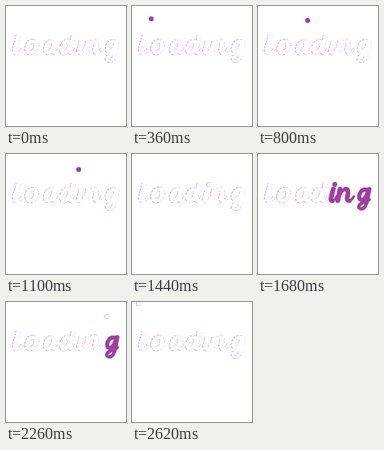
Animation of 150 by 150 pixels, one loop 2640 ms. Source, as an HTML page with a canvas:

```html
<!DOCTYPE html>
<html lang="en">
<head>
<meta charset="utf-8">
<title>Loading</title>
<style>
  html, body { margin: 0; width: 100%; height: 100%; overflow: hidden; background: #fff; }
  canvas { display: block; width: 150px; height: 150px; }
</style>
</head>
<body>
<canvas id="stage" width="150" height="150" role="img" aria-label="loading"></canvas>
<script>
const ctx = document.getElementById('stage').getContext('2d');
const LOOP = 2640, STEP = 20, BASELINE = 61;
const PURPLE = '#9f3fa2', FRINGE = '#c468cc';

// Each letter is a set of pen strokes: [pen width, path].
const letter = (center, hits, filled, ...strokes) => ({
  center, hits, filled,
  strokes: strokes.map(([width, d]) => ({ width, path: new Path2D(d) }))
});

const letters = [
  letter(13, [130], null,
    [5.2, 'M15 37L11 53Q9.5 58.3 13 58.3'],
    [2.6, 'M13 59Q18 58 20.5 53']),
  letter(33, [475], null,
    [5, 'M34 44C26 43 23 58.5 30 58.5C38 58.5 40 44 34 44'],
    [1.8, 'M37 47Q39 49 42 48']),
  letter(54, [720], null,
    [4.8, 'M60 45C50 41 46 58.5 52 58.5C56 58.5 59 52 60 46'],
    [5.2, 'M61.5 44L59 54Q58 58.3 61 58.3'],
    [2.6, 'M61 59Q65 57 66 53']),
  letter(75, [950], null,
    [4.8, 'M79 45C70 41 66 58.5 72 58.5C76 58.5 79 52 80 46'],
    [5.2, 'M84 37L80 54Q79 58.3 82 58.3'],
    [2.6, 'M82 59Q86 57 87 53']),
  letter(93, [1165, 1395, 1930], [1660, 1930],
    [5.6, 'M94 44L91.5 54Q90.5 58.2 93 58.2'],
    [2.6, 'M93 59Q97 57 98 53']),
  letter(109, [2130], [1660, 2110],
    [5.6, 'M102.5 44L99.8 58.2'],
    [3.6, 'M102 51Q106 44 109.5 43.7'],
    [5.4, 'M109.5 44Q114 44 112 52Q110 58.3 114 58.3'],
    [2.6, 'M114 59Q118 57 120 53']),
  letter(132, [2330], [1660, 2320],
    [4.8, 'M137 45C127 41 123 57.5 130 57.5C134 57 136 52 138 45'],
    [5.2, 'M139 44L135.5 61'],
    [3.8, 'M135.5 61Q134 69 128.5 68.6Q124 67.5 127 63.5Q130 60.5 139 57'])
];

// Resting points of the ball: time, x, y.
const stops = [
  [130, 13, 31], [245, 13, 31], [475, 35, 38], [720, 53, 38], [950, 79, 38],
  [1165, 96, 38], [1395, 96, 38], [1930, 96, 38], [2130, 112, 38], [2330, 134, 38]
];
const APEX = 16;
const mix = (a, b, u) => a + (b - a) * u;

function ballAt(t) {
  if (t < 40) return null;
  if (t < 130) {
    const u = (t - 40) / 90;
    return [mix(10, 13, u), mix(16, 31, u * u)];
  }
  for (let i = 1; i < stops.length; i++) {
    const [t0, x0, y0] = stops[i - 1], [t1, x1, y1] = stops[i];
    if (t >= t1) continue;
    const u = (t - t0) / (t1 - t0);
    const resting = t0 === 130 || t0 === 1395;
    const lift = resting ? 0 : 4 * ((y0 + y1) / 2 - APEX) * u * (1 - u);
    return [mix(x0, x1, u), mix(y0, y1, u) - lift];
  }
  if (t < 2500) return [134, mix(38, -5, (t - 2330) / 170)];
  if (t >= 2600) return [8, 2 - (2620 - t) * 0.15];
  return null;
}

function squash(hits, t) {
  return hits.reduce((sum, hit) => {
    const age = t - hit;
    return age < 0 || age > 180 ? sum
      : sum + Math.sin(age / 180 * Math.PI * 2) * (1 - age / 180);
  }, 0);
}

function drawLetter(item, t, color, grow, shift) {
  const s = squash(item.hits, t);
  ctx.save();
  ctx.translate(item.center + shift, BASELINE);
  ctx.scale(1 + 0.12 * s, 1 - 0.16 * s);
  ctx.translate(-item.center, -BASELINE);
  ctx.strokeStyle = color;
  for (const { width, path } of item.strokes) {
    ctx.lineWidth = width + grow;
    ctx.stroke(path);
  }
  ctx.restore();
}

function disc(x, y, r, color) {
  ctx.fillStyle = color;
  ctx.beginPath();
  ctx.arc(x, y, r, 0, Math.PI * 2);
  ctx.fill();
}

// A broken rim, heavier on the left, around a white body.
function drawHollow(items, t) {
  ctx.lineCap = 'butt';
  ctx.setLineDash([2.4, 1.1]);
  items.forEach(item => drawLetter(item, t, FRINGE, 0.8, 0));
  ctx.setLineDash([]);
  ctx.lineCap = 'round';
  items.forEach(item => drawLetter(item, t, '#fff', 0.1, 0.3));
}

function draw(t) {
  ctx.fillStyle = '#fff';
  ctx.fillRect(0, 0, 150, 150);
  ctx.lineJoin = 'round';

  const isFilled = ({ filled }) => filled && t >= filled[0] && t < filled[1];
  drawHollow(letters.filter(item => !isFilled(item)), t);
  letters.filter(isFilled).forEach(item => drawLetter(item, t, PURPLE, 0.4, 0));

  const ball = ballAt(t);
  if (!ball) return;
  const solid = t < 1120 || (t >= 1660 && t < 2200);
  if (solid) {
    disc(...ball, 3.1, PURPLE);
  } else {
    disc(...ball, 3, FRINGE);
    disc(ball[0] + 0.25, ball[1], 2.7, '#fff');
  }
}

const start = performance.now();
function tick() {
  const t = (performance.now() - start) % LOOP;
  draw(Math.floor(t / STEP) * STEP);
  requestAnimationFrame(tick);
}
tick();
</script>
</body>
</html>
```
